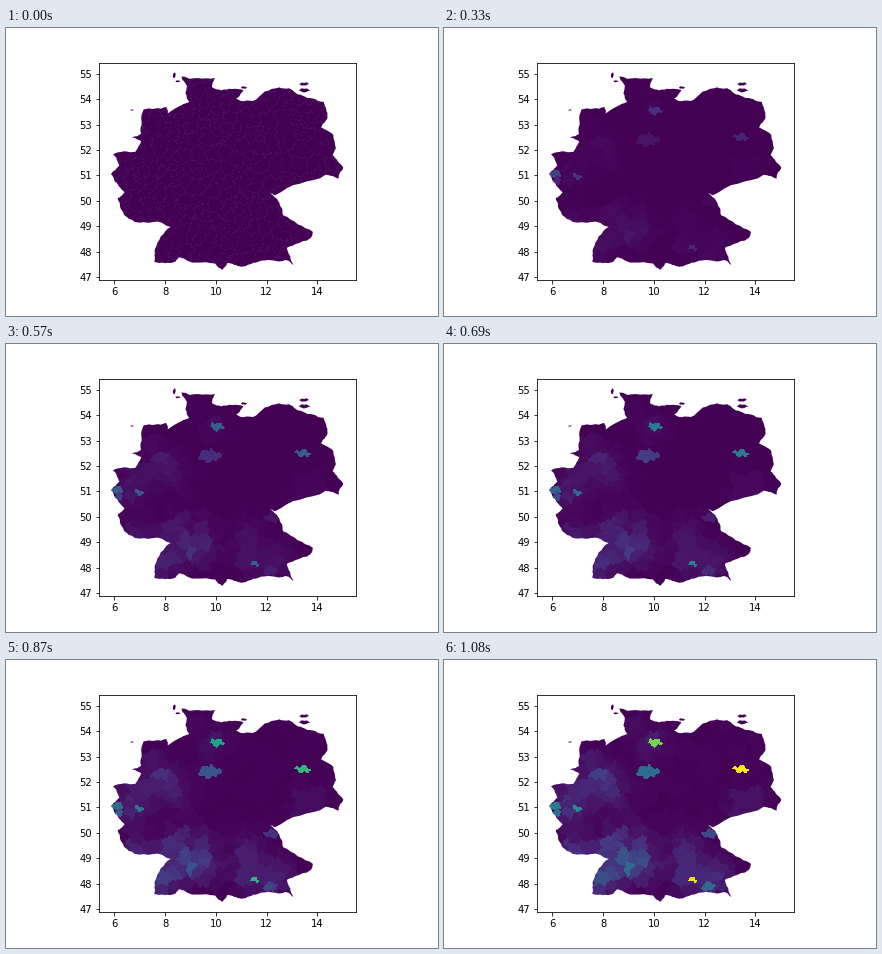
Animation of 432 by 288 pixels, one loop 1110 ms. Source, as a matplotlib script:

```python
import numpy as np
import matplotlib.pyplot as plt
from matplotlib.animation import FuncAnimation
from matplotlib.path import Path

FRAMES, INTERVAL = 37, 30
XLIM, YLIM = (5.4075, 15.5007), (46.881, 55.447)
rng = np.random.default_rng(7)

# Corner points of the border, clockwise from the north-west
BORDER = [
    (8.63, 54.9), (9.97, 54.84), (9.85, 54.48), (10.2, 54.35), (11.08, 54.36),
    (10.8, 54.02), (11.45, 53.93), (12.5, 54.47), (12.9, 54.43),
    (13.4, 54.15), (14.25, 53.9), (14.4, 53.3), (14.14, 52.9), (14.63, 52.58),
    (14.73, 52.08), (14.6, 51.8), (15.02, 51.3), (14.83, 50.87),
    (14.33, 51.03), (12.33, 50.22), (12.1, 50.3), (12.5, 49.93),
    (12.65, 49.43), (13.83, 48.77), (13.72, 48.52), (13.4, 48.4),
    (12.8, 48.15), (13.05, 47.48), (12.75, 47.67), (11.65, 47.59),
    (11.0, 47.4), (10.45, 47.55), (10.25, 47.28), (9.97, 47.53), (8.55, 47.78),
    (8.4, 47.6), (7.58, 47.59), (7.6, 48.1), (8.22, 48.97), (6.8, 49.17),
    (6.37, 49.47), (6.13, 50.1), (6.4, 50.33), (6.02, 50.75), (5.87, 51.05),
    (6.2, 51.4), (5.95, 51.83), (6.83, 51.93), (7.06, 52.35), (6.7, 52.5),
    (7.05, 52.64), (7.15, 53.6), (8.05, 53.7), (8.1, 53.45), (8.5, 53.7),
    (8.95, 53.9), (8.8, 54.25), (8.85, 54.55)]
# Islands: lon, lat, half width, half height
ISLANDS = [(8.36, 54.95, .06, .13), (8.5, 54.71, .12, .04),
           (11.1, 54.46, .13, .06), (13.45, 54.6, .26, .09),
           (13.5, 54.35, .24, .1), (6.7, 53.58, .08, .03)]
# Districts that stand out: lon, lat, half width, half height, level, power
HOT = [(13.42, 52.49, .32, .14, 1, 1.9), (10.03, 53.54, .28, .16, .8, 1.5),
       (11.56, 48.15, .19, .1, .97, 1.8), (9.75, 52.39, .47, .26, .36, 1.6),
       (6.11, 51.05, .27, .15, .42, .62), (6.97, 50.95, .19, .12, .49, .95),
       (6.18, 50.77, .18, .18, .36, 1.1), (12.12, 47.87, .28, .2, .33, 2.2),
       (12.2, 49.95, .32, .18, .22, 2)]
# Regional spread: lon, lat, level
REGIONS = [(7.6, 52.1, .16), (8.3, 51.6, .08), (6.7, 51.1, .14),
           (9.3, 48.8, .28), (8.0, 48.2, .2), (8.6, 49.5, .13),
           (6.9, 49.3, .13), (11.2, 49.3, .08), (11.6, 48.2, .12),
           (12.6, 48.3, .08), (13.7, 51, .07), (9.9, 53.6, .05)]


def rough(points, amount=.1, depth=3):
    """Break every edge at a displaced midpoint."""
    p = np.array(points)
    for _ in range(depth):
        edge = np.roll(p, -1, 0) - p
        shift = edge[:, ::-1] * [1, -1] * rng.uniform(-amount, amount, (len(p), 1))
        p = np.stack([p, p + edge / 2 + shift], 1).reshape(-1, 2)
    return Path(np.vstack([p, p[:1]]), closed=True)


def island(x, y, rx, ry):
    a = np.linspace(0, 2 * np.pi, 7)[:-1]
    r = rng.uniform(.6, 1.1, len(a))
    return rough(np.column_stack([x + rx * r * np.cos(a), y + ry * r * np.sin(a)]))


country = Path.make_compound_path(rough(BORDER), *[island(*i) for i in ISLANDS])

# Map cells: nearest seed on a slightly warped grid
W, H = 257, 218
gx, gy = np.meshgrid(
    XLIM[0] + (np.arange(W) + .5) / W * (XLIM[1] - XLIM[0]),
    YLIM[0] + (np.arange(H) + .5) / H * (YLIM[1] - YLIM[0]))
wx = gx + .04 * np.sin(17 * gy) + .02 * np.sin(43 * gy + 9 * gx)
wy = gy + .04 * np.sin(19 * gx) + .02 * np.sin(37 * gx - 8 * gy)

N = 560
sx, sy = rng.uniform(*XLIM, N), rng.uniform(*YLIM, N)
cells = np.array([
    np.argmin((a[:, None] - sx) ** 2 + (b[:, None] - sy) ** 2, axis=1)
    for a, b in zip(wx, wy)])
for k, (x, y, rx, ry, *_) in enumerate(HOT):
    inside = np.abs((wx - x) / rx) ** 1.5 + np.abs((wy - y) / ry) ** 1.5 < 1
    cells[inside] = N + k

spread = .012 + sum(level * np.exp(-((sx - x) ** 2 + (sy - y) ** 2) / .45)
                    for x, y, level in REGIONS)
spread *= rng.uniform(.55, 1.25, N)
final = np.append(spread, [h[4] for h in HOT])
power = np.append(np.full(N, 1.5), [h[5] for h in HOT])

seams = np.zeros((H, W), bool)
seams[:, 1:] |= cells[:, 1:] != cells[:, :-1]
seams[1:] |= cells[1:] != cells[:-1]
seams &= rng.random((H, W)) < .6


def levels(i):
    values = (final * (i / (FRAMES - 1)) ** power)[cells]
    return values + .045 * seams if i == 0 else values


fig = plt.figure(figsize=(6, 4), dpi=72, facecolor="white")
ax = fig.add_axes([.125, .125, .775, .755])
image = ax.imshow(levels(0), cmap="viridis", vmin=0, vmax=1, origin="lower",
                  extent=(*XLIM, *YLIM), interpolation="nearest")
image.set_clip_path(country, ax.transData)
ax.set(xlim=XLIM, ylim=YLIM, aspect="equal",
       xticks=range(6, 15, 2), yticks=range(47, 56))


def update(i):
    image.set_data(levels(i))
    return [image]


anim = FuncAnimation(fig, update, frames=FRAMES, interval=INTERVAL,
                     repeat=True, repeat_delay=0)
plt.show()
```
